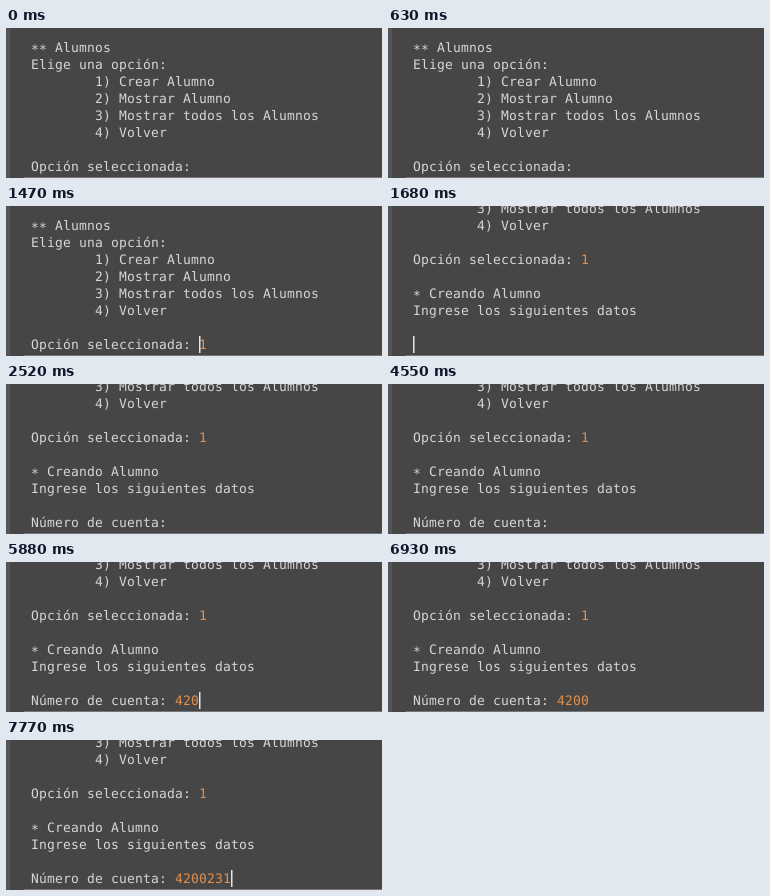
Write an HTML page with a canvas that moves like this. It is 376x150 px and loops after 8 s.

```html
<!DOCTYPE html>
<html lang="es">
<head>
<meta charset="utf-8">
<title>Consola</title>
<style>
html, body { margin: 0; width: 100%; height: 100%; overflow: hidden; background: #464646; }
canvas { display: block; }
</style>
</head>
<body>
<canvas id="stage"></canvas>
<script>
const W = 376, H = 150, LOOP = 8000, STEP = 70, BLINK = 516;
const LEFT = 25, CELL = 8, ROW = 17, BASE = 24, LAST_ROW = 7;
const BACK = '#464646', EDGE = '#555555', RULE = '#757575';
const TEXT = '#d6d6d6', INPUT = '#e0904e', CARET = '#e6e6e6';

const canvas = document.getElementById('stage');
const ctx = canvas.getContext('2d');
const scale = window.devicePixelRatio || 1;
canvas.width = W * scale;
canvas.height = H * scale;
canvas.style.width = W + 'px';
canvas.style.height = H + 'px';

const TAB = ' '.repeat(8);
const CHOOSE = 'Opción seleccionada: ';
const ASK = 'Número de cuenta: ';
const MENU = [
  '** Alumnos',
  'Elige una opción:',
  TAB + '1) Crear Alumno',
  TAB + '2) Mostrar Alumno',
  TAB + '3) Mostrar todos los Alumnos',
  TAB + '4) Volver',
  ''
];
const FORM = ['', '* Creando Alumno', 'Ingrese los siguientes datos', ''];

const READY = 70, CHOICE = 1120, ENTER = 1470, SCROLL = 1680, PROMPT = 1960;
const KEYS = [4970, 5460, 5880, 6370, 7070, 7280, 7770];
const ACTIONS = [READY, CHOICE, ENTER, SCROLL, PROMPT, ...KEYS];
const before = (times, t) => times.filter(at => at <= t);

function write(str, col, row, color) {
  ctx.fillStyle = color;
  [...str].forEach((ch, i) => {
    const drop = ch === '*' ? 2 : 0; // centre asterisks on the line
    ctx.fillText(ch, LEFT + (col + i) * CELL, BASE + row * ROW + drop);
  });
}

function writeField(label, value, row) {
  write(label, 0, row, TEXT);
  write(value, label.length, row, INPUT);
}

function caretColumn(t, choice, account) {
  if (t >= PROMPT) return ASK.length + account.length;
  if (t >= SCROLL) return 0;
  return CHOOSE.length + (t < ENTER ? choice.length : 0);
}

// The caret stays lit after each action, then blinks.
function caretLit(t) {
  const last = before(ACTIONS, t).pop();
  return last !== undefined && Math.floor((t - last) / BLINK) % 2 === 0;
}

function draw(time) {
  const t = Math.floor(time / STEP) * STEP;
  const choice = t >= CHOICE ? '1' : '';
  const account = '4200231'.slice(0, before(KEYS, t).length);
  const shift = t >= SCROLL ? FORM.length + 1 : 0;

  ctx.setTransform(scale, 0, 0, scale, 0, 0);
  ctx.fillStyle = BACK;
  ctx.fillRect(0, 0, W, H);
  ctx.font = '13px "DejaVu Sans Mono", monospace';
  ctx.textRendering = 'geometricPrecision';

  MENU.forEach((line, i) => write(line, 0, i - shift, TEXT));
  writeField(CHOOSE, choice, LAST_ROW - shift);
  if (shift) FORM.forEach((line, i) => write(line, 0, LAST_ROW + 1 + i - shift, TEXT));
  if (t >= PROMPT) writeField(ASK, account, LAST_ROW);

  if (caretLit(t)) {
    ctx.fillStyle = CARET;
    ctx.fillRect(LEFT + caretColumn(t, choice, account) * CELL, 130, 1.5, ROW);
  }

  ctx.fillStyle = EDGE;
  ctx.fillRect(0, 0, 4, H);
  ctx.fillStyle = RULE;
  ctx.fillRect(18, H - 1, W - 18, 1);
}

const start = performance.now();
function tick() {
  draw((performance.now() - start) % LOOP);
  requestAnimationFrame(tick);
}
tick();
</script>
</body>
</html>
```
